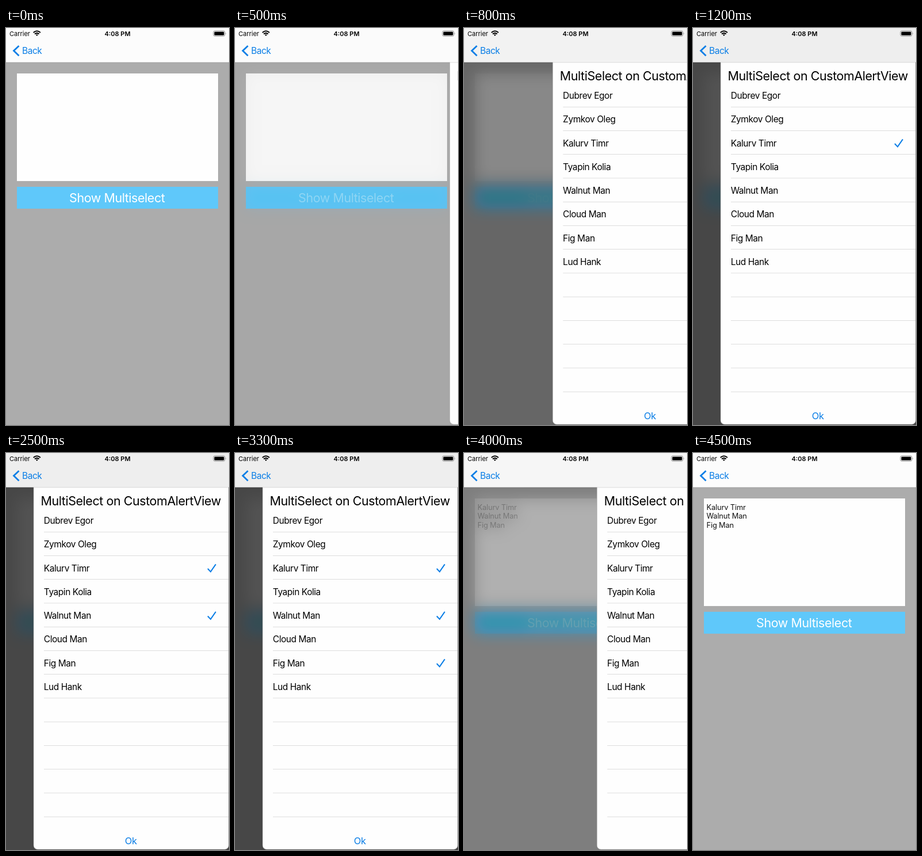
Recreate the animation shown at these times as an HTML page. Size 388 by 690 pixels, loop 4.6 s.

```html
<!DOCTYPE html>
<html lang="en">
<head>
<meta charset="utf-8">
<title>Multiselect panel</title>
<style>
  html, body { margin: 0; width: 100%; height: 100%; overflow: hidden; background: #acacac; }
  svg { display: block; font-family: Inter, Roboto, sans-serif; letter-spacing: -.028em; }
  .blue { fill: #0a7ee6; }
  .stroke { fill: none; stroke: #0a7ee6; }
  .row { font-size: 15.5px; }
  .big { font-size: 21.5px; }
  .note { font-size: 12.8px; letter-spacing: -.01em; }
  .status { font-size: 11px; letter-spacing: 0; }
  #blurred { filter: blur(13px) saturate(1.8); }
</style>
</head>
<body>
<svg width="388" height="690" viewBox="0 0 388 690">
  <g id="page">
    <rect x="-60" y="-60" width="508" height="810" fill="#acacac"/>
    <rect x="19" y="79" width="350" height="187" fill="#fefefe"/>
    <g id="notes" fill="#111"></g>
    <rect x="19" y="276" width="350" height="38" fill="#5fc8fa"/>
    <text id="label" class="big" x="193.2" y="303.3" text-anchor="middle" fill="#fff">Show Multiselect</text>
  </g>
  <g id="haze"><use id="blurred" href="#page"/></g>
  <rect id="veil" width="388" height="690" fill="#363636"/>

  <g id="panel">
    <rect x="48" y="40" width="339.5" height="649" rx="7" fill="#fefefe" stroke="#8a8a8a" stroke-width=".5"/>
    <text class="big" x="60.5" y="91">MultiSelect on CustomAlertView</text>
    <g id="rows"></g>
    <text class="blue" x="217.2" y="680" text-anchor="middle" font-size="16.5">Ok</text>
  </g>

  <rect id="bar" width="388" height="59.7"/>
  <rect y="59.7" width="388" height=".5" fill="#000" fill-opacity=".25"/>
  <path class="stroke" d="M22.5 31 L13.5 39.6 L22.5 48.2" stroke-width="2.8"/>
  <text class="row blue" x="28" y="45.2">Back</text>
  <text class="status" x="6" y="13.8">Carrier</text>
  <text class="status" x="194" y="13.8" text-anchor="middle" font-weight="600">4:08 PM</text>
  <g fill="none" stroke="#000" stroke-width="2">
    <path d="M47.7 8 Q53.8 2.4 59.9 8"/>
    <path d="M50 10.6 Q53.8 7.2 57.6 10.6"/>
    <path d="M51.9 11.8 Q53.8 10.4 55.7 11.8 L53.8 13.9 Z" fill="#000" stroke="none"/>
  </g>
  <rect x="360.9" y="4.9" width="20" height="9.4" rx="2.6" fill="none" stroke="#888" stroke-width=".9"/>
  <rect x="362.4" y="6.4" width="17" height="6.4" rx="1.4"/>
  <path d="M382.2 8 q1.5 1.6 0 3.2 z" fill="#888"/>
</svg>
<script>
const LOOP = 4600;
const OPEN = [424, 600], CLOSE = [3770, 440];
const TRAVEL = 341;
const PRESS = 300, RELEASE = 470, CONFIRM = 3720;
const people = ["Dubrev Egor", "Zymkov Oleg", "Kalurv Timr", "Tyapin Kolia",
                "Walnut Man", "Cloud Man", "Fig Man", "Lud Hank"];
const picks = [[2, 1200], [4, 1900], [6, 2700]];
const ROW = 41.25;

const $ = id => document.getElementById(id);
const clamp = v => Math.min(1, Math.max(0, v));

function add(parent, tag, attrs, text = "") {
  const el = document.createElementNS("http://www.w3.org/2000/svg", tag);
  for (const key in attrs) el.setAttribute(key, attrs[key]);
  el.textContent = text;
  return parent.appendChild(el);
}

for (let i = 0; i < 13; i++) {
  add($("rows"), "rect", { x: 66, y: 136.9 + ROW * i, width: 321, height: .6, fill: "#c8c8c8" });
}
people.forEach((name, i) =>
  add($("rows"), "text", { class: "row", x: 65.8, y: 123 + ROW * i }, name));

const checks = picks.map(([row, at], i) => {
  add($("notes"), "text", { class: "note", x: 23.5, y: 98.6 + 15.8 * i }, people[row]);
  const y = 117.5 + ROW * row;
  const mark = add($("rows"), "path", {
    class: "stroke", "stroke-width": 2, d: `M351 ${y + 1} l5 5.4 l9 -13`
  });
  return { mark, at };
});

function ease(t, [start, length]) {
  const k = clamp((t - start) / length);
  return k * k * (3 - 2 * k);
}

function labelAlpha(t) {
  if (t < PRESS) return 1;
  return .35 + .65 * clamp((t - RELEASE) / 700);
}

const begin = performance.now();

function draw() {
  const t = (performance.now() - begin) % LOOP;
  const shown = ease(t, OPEN) - ease(t, CLOSE);
  const shade = Math.round(252 - 14 * shown);
  $("panel").setAttribute("transform", `translate(${TRAVEL * (1 - shown)} 0)`);
  // The blur sets in faster than the darkening.
  $("haze").setAttribute("opacity", 1 - (1 - shown) ** 2);
  $("veil").setAttribute("opacity", .85 * shown);
  $("bar").setAttribute("fill", `rgb(${shade},${shade},${shade})`);
  $("label").setAttribute("opacity", labelAlpha(t));
  $("notes").setAttribute("opacity", t >= CONFIRM ? 1 : 0);
  for (const { mark, at } of checks) mark.setAttribute("opacity", t >= at ? 1 : 0);
  requestAnimationFrame(draw);
}
draw();
</script>
</body>
</html>
```
